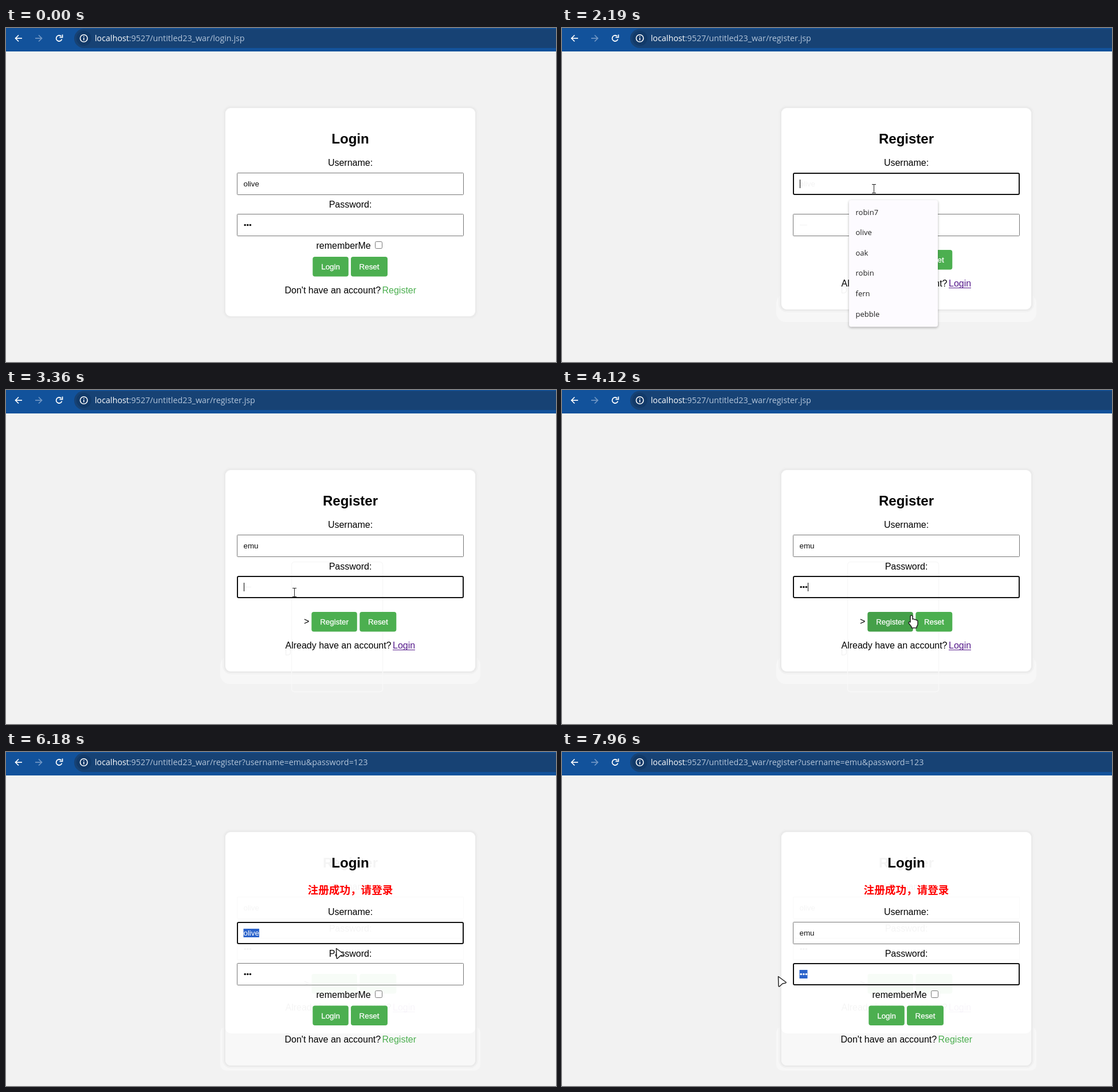
An HTML page with a canvas for the animation above (8 s loop, 960x584 px).

```html
<!DOCTYPE html>
<html lang="en">
<head>
<meta charset="utf-8">
<title>Login and register</title>
<style>
  html, body { margin: 0; width: 100%; height: 100%; overflow: hidden; background: #f2f2f2; }
  canvas { display: block; }
</style>
</head>
<body>
<canvas id="stage" width="960" height="584"></canvas>
<script>
const ctx = document.getElementById('stage').getContext('2d');
const LOOP = 8000, CENTER = 601;
const SANS = '"Liberation Sans", Arial, sans-serif';
const UI = '"Open Sans", "Noto Sans", sans-serif';
const CJK = '"Noto Sans CJK SC", "Noto Sans CJK", sans-serif';
const GREEN = '#4caf50', OLD_USER = 'olive', NEW_USER = 'emu';
const SUGGESTIONS = ['robin7', OLD_USER, 'oak', 'robin', 'fern', 'pebble'];
const TO_REGISTER = 730, TO_MESSAGE = 4860;
const KEY_TIMES = [1160, 2620, 2700, 3040, 3220, 3510, 3600, 3690, 5750, 6650, 6740, 7070, 7300];

// time, x, y, shape until the next entry (empty = hidden)
const CURSOR = [
  [0, 552, 584, ''], [40, 552, 575, 'arrow'], [250, 773, 466, 'arrow'], [400, 690, 461, 'hand'],
  [460, 686, 462, 'hand'], [1030, 686, 462, 'arrow'], [1070, 544, 281, 'beam'],
  [3040, 544, 281, 'beam'], [3220, 503, 354, 'beam'], [3510, 503, 354, ''],
  [3880, 503, 354, 'arrow'], [4000, 575, 396, 'hand'], [4120, 610, 394, 'hand'],
  [4300, 606, 412, 'hand'], [4590, 600, 410, 'hand'], [4860, 600, 410, 'arrow'],
  [5060, 616, 283, 'arrow'], [5380, 480, 318, 'beam'], [5750, 470, 318, 'beam'],
  [5840, 402, 319, 'arrow'], [5920, 346, 321, 'arrow'], [6180, 576, 343, 'arrow'],
  [6650, 576, 343, ''], [7070, 576, 343, 'arrow'], [7250, 500, 390, 'beam'],
  [7500, 470, 388, 'beam'], [7620, 402, 390, 'arrow'], [7800, 311, 394, 'arrow'],
  [7870, 311, 394, 'arrow'], [7960, 377, 392, 'arrow'], [LOOP, 377, 392, 'arrow']
];

const within = (t, from, to) => t >= from && t < to;
const countPast = (t, times) => times.filter(time => time <= t).length;

function text(str, x, y, { size = 16, color = '#000', weight = '', font = SANS, align = 'left' } = {}) {
  ctx.font = `${weight} ${size}px ${font}`;
  ctx.fillStyle = color;
  ctx.textAlign = align;
  ctx.fillText(str, x, y);
}

const centered = (str, y, options) => text(str, CENTER, y, { align: 'center', ...options });

function box(x, y, w, h, r, fill, stroke, lineWidth = 1) {
  ctx.beginPath();
  ctx.roundRect(x, y, w, h, r);
  if (fill) { ctx.fillStyle = fill; ctx.fill(); }
  if (stroke) { ctx.strokeStyle = stroke; ctx.lineWidth = lineWidth; ctx.stroke(); }
}

function line(color, width, ...points) {
  ctx.strokeStyle = color;
  ctx.lineWidth = width;
  ctx.beginPath();
  points.forEach(([x, y], i) => i ? ctx.lineTo(x, y) : ctx.moveTo(x, y));
  ctx.stroke();
}

function button(label, x, y, w, color = GREEN) {
  box(x, y, w, 34.5, 4, color);
  text(label, x + w / 2, y + 22, { size: 13.333, color: '#fff', align: 'center' });
  ctx.strokeStyle = '#fff';
  ctx.lineWidth = 0.3;
  ctx.strokeText(label, x + w / 2, y + 22);
}

function dots(count, y, color) {
  ctx.fillStyle = color;
  for (let i = 0; i < count; i++) {
    ctx.beginPath();
    ctx.arc(417.2 + i * 4.6, y, 1.8, 0, 7);
    ctx.fill();
  }
}

// value is a string for plain text, a number for masked characters
function field(y, value, { focus, caret, selected } = {}) {
  if (focus) box(404, y + 1, 394, 37, 2, null, '#101010', 2);
  else box(403.5, y + 0.5, 395, 38, 1, null, '#767676');
  const masked = typeof value === 'number';
  ctx.font = `13.333px ${SANS}`;
  const width = masked ? value * 4.66 : ctx.measureText(value).width;
  if (selected) {
    ctx.fillStyle = '#2b63cb';
    ctx.fillRect(414.5, y + 12, width, 15);
  }
  const color = selected ? '#fff' : '#111';
  if (masked) dots(value, y + 19.5, color);
  else text(value, 414.5, y + 24, { size: 13.333, color });
  if (focus && caret && !selected) {
    ctx.fillStyle = '#000';
    ctx.fillRect(Math.round(415 + width), y + 12, 1, 15);
  }
}

function credentials(dy, user, userState, password, passwordState) {
  centered('Username:', 241 + dy);
  field(253 + dy, user, userState);
  centered('Password:', 314 + dy);
  field(325 + dy, password, passwordState);
}

function loginForm(dy, ...fields) {
  centered('Login', 202, { size: 24, weight: 'bold' });
  credentials(dy, ...fields);
  text('rememberMe', 541.5, 386 + dy);
  box(644.5, 373.5 + dy, 12, 12, 2, '#fff', '#767676');
  const buttonY = 400 + Math.max(0, dy - 0.5);
  button('Login', 535.3, buttonY, 62.5);
  button('Reset', 602, buttonY, 64);
  text("Don't have an account?", 486.5, 464 + dy);
  text('Register', 656.5, 464 + dy, { color: GREEN });
}

function registerForm(hover, ...fields) {
  centered('Register', 202, { size: 24, weight: 'bold' });
  credentials(0, ...fields);
  text('>', 520, 410);
  button('Register', 533.3, 388, 79.5, hover ? '#45a049' : GREEN);
  button('Reset', 617.3, 388, 64);
  text('Already have an account?', 487.5, 452);
  text('Login', 675, 452, { color: '#551a8b' });
  line('#551a8b', 1, [675, 454.5], [714, 454.5]);
}

function card(bottom) {
  box(378.5, 135.5, 445, bottom - 131, 14, null, '#efefef');
  box(380, 137, 442, bottom - 134, 12, '#ebebeb');
  box(383, 140, 436, bottom - 140, 9, '#fff');
}

function suggestions() {
  ctx.save();
  ctx.shadowColor = 'rgba(0,0,0,.3)';
  ctx.shadowBlur = 4;
  ctx.shadowOffsetY = 1.5;
  box(501, 301, 155, 221.5, 4, '#fdfbff');
  ctx.restore();
  SUGGESTIONS.forEach((name, i) =>
    text(name, 512.5, 326.5 + i * 35.6, { size: 13, font: UI, color: '#1f1f1f' }));
}

function closedSuggestions(t) {
  if (t < 3360) {
    box(501, 301, 151, 191, 0, 'rgba(255,255,255,.13)');
    SUGGESTIONS.forEach((name, i) =>
      text(name, 515.5, 330 + i * 34.1, { size: 13, font: UI, color: 'rgba(0,0,0,.1)' }));
  }
  box(498.5, 300.5, 159, 227, 5, null, '#f8f8f8', 1.5);
}

function loginPage() {
  card(504);
  loginForm(0, OLD_USER, {}, 3, {});
}

function registerPage(t, caret, cursorShape) {
  box(374, 465, 454, 49, 16, '#f7f7f7');
  card(492);
  text(OLD_USER, 414.5, 277, { size: 13.333, color: 'rgba(0,0,0,.05)' });
  line('rgba(0,0,0,.04)', 1.5, [415, 344.5], [428, 344.5]);
  text('D', 486.5, 464, { color: 'rgba(0,0,0,.05)' });
  if (t > 2620) closedSuggestions(t);
  registerForm(cursorShape === 'hand' && t > 3900,
    NEW_USER.slice(0, countPast(t, [2620, 2700, 3040])), { focus: within(t, 1070, 3360), caret: caret && t < 3220 },
    countPast(t, [3510, 3600, 3690]), { focus: t >= 3220, caret });
  if (within(t, 1110, 2620)) suggestions();
}

function messagePage(t, caret) {
  box(374, 480, 454, 77, 10, '#f7f7f7');
  card(548);
  box(383, 470, 436, 78, 9, '#f8f8f8');
  box(383, 440, 436, 52, 9, '#fff');
  ctx.globalAlpha = 0.045;
  registerForm(false, OLD_USER, {}, 3, {});
  ctx.globalAlpha = 1;
  centered('注册成功，请登录', 248, { size: 18.6, weight: 'bold', font: CJK, color: '#f00' });
  const typed = countPast(t, [6650, 6740, 7070]);
  loginForm(44,
    typed ? NEW_USER.slice(0, typed) : OLD_USER,
    { focus: within(t, 5750, 7300), caret, selected: within(t, 5880, 6650) },
    3, { focus: t >= 7300, caret, selected: t >= 7620 });
}

function browserBar(url, loading) {
  ctx.fillStyle = '#12529b';
  ctx.fillRect(0, 0, 960, 41);
  box(119, 1.5, 900, 33.5, 17, '#174274');
  box(123, 5, 26, 26, 13, '#123a69');
  ctx.lineCap = 'butt';
  for (const [x, dir, color] of [[16.5, 1, '#fff'], [62.5, -1, '#7399c6']]) {
    line(color, 1.7, [x + 11.5 * dir, 18], [x, 18]);
    line(color, 1.7, [x + 5.5 * dir, 12.5], [x, 18], [x + 5.5 * dir, 23.5]);
  }
  if (loading) {
    line('#fff', 1.8, [88, 13], [98, 23]);
    line('#fff', 1.8, [98, 13], [88, 23]);
  } else {
    ctx.strokeStyle = '#fff';
    ctx.lineWidth = 1.8;
    ctx.beginPath();
    ctx.arc(92.7, 18, 5, 0.3, 5.5);
    ctx.stroke();
    line('#fff', 1.8, [98.5, 11.5], [98.5, 16.3], [93.5, 16.3]);
  }
  box(129.5, 11.7, 12.6, 12.6, 6.3, null, '#fff', 1.6);
  line('#fff', 1.6, [135.8, 17], [135.8, 21.5]);
  line('#fff', 1.6, [135.8, 14.2], [135.8, 15.8]);
  const style = { size: 14.3, font: UI };
  text('localhost', 155, 23, { ...style, color: '#fff' });
  text(':9527/untitled23_war/' + url, 214.8, 23, { ...style, color: '#b3c5da' });
}

const SHAPES = {
  arrow: new Path2D('M0.5 0.5 L14 10.5 Q14.5 11.5 13 12 L8 13 L2.5 18 Q1 18.5 1 17 Z'),
  hand: new Path2D('M-2 11 V1.5 Q0 -1.5 2 1.5 V7 Q4 5.5 5.5 7.5 Q7.5 6.5 8.5 8.5 Q10.5 8 11 10 V15 Q11 18 9 20 V22 H0 V20 L-5 13.5 Q-5.5 10.5 -2 12 Z')
};

function cursorAt(t) {
  const next = CURSOR.findIndex(key => key[0] > t);
  const [t0, x0, y0, shape] = CURSOR[next - 1], [t1, x1, y1] = CURSOR[next];
  const k = (t - t0) / (t1 - t0);
  return { x: x0 + (x1 - x0) * k, y: y0 + (y1 - y0) * k, shape };
}

function drawCursor({ x, y, shape }) {
  if (!shape) return;
  ctx.save();
  ctx.translate(Math.round(x), Math.round(y));
  if (shape === 'beam') {
    line('#222', 1, [0.5, -7], [0.5, 7]);
    for (const end of [-7.5, 7.5]) line('#222', 1, [-3, end], [4, end]);
  } else {
    ctx.lineJoin = 'round';
    ctx.fillStyle = '#fff';
    ctx.strokeStyle = '#222';
    ctx.lineWidth = 1.5;
    ctx.fill(SHAPES[shape]);
    ctx.stroke(SHAPES[shape]);
  }
  ctx.restore();
}

function draw(t) {
  const cursor = cursorAt(t);
  const lastKey = KEY_TIMES[countPast(t, KEY_TIMES) - 1] ?? 0;
  const caret = (t - lastKey) % 1030 < 515;
  ctx.fillStyle = '#f2f2f2';
  ctx.fillRect(0, 0, 960, 584);
  let url = 'login.jsp';
  if (t < TO_REGISTER) {
    loginPage();
  } else if (t < TO_MESSAGE) {
    url = 'register.jsp';
    registerPage(t, caret, cursor.shape);
  } else {
    url = `register?username=${NEW_USER}&password=123`;
    messagePage(t, caret);
  }
  browserBar(url, within(t, 650, 890) || within(t, 4770, 4950));
  drawCursor(cursor);
}

const start = performance.now();
function tick() {
  draw((performance.now() - start) % LOOP);
  requestAnimationFrame(tick);
}
tick();
</script>
</body>
</html>
```
